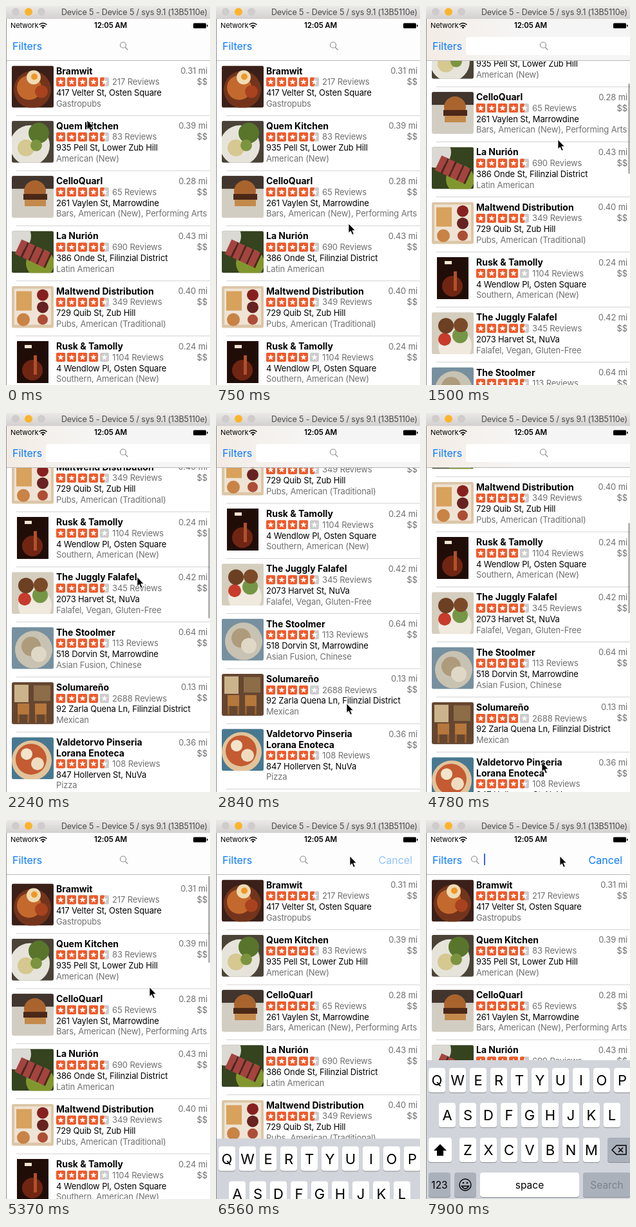
An HTML page that plays this animation: 317 by 587 pixels, repeating every 8000 ms.

```html
<!DOCTYPE html>
<html lang="en">
<head>
<meta charset="utf-8">
<title>Restaurant list</title>
<style>
html, body { margin: 0; width: 100%; height: 100%; overflow: hidden; background: #fff; }
svg { display: block; width: 317px; height: 587px; font: 13px Inter, Roboto, sans-serif; letter-spacing: -.13px; }
.name { font-size: 14px; font-weight: 700; letter-spacing: 0; }
.dim { fill: #707070; }
.link { font-size: 16px; fill: #0a7aff; letter-spacing: 0; }
.key { font-size: 22px; letter-spacing: 0; }
.small { font-size: 15.5px; letter-spacing: 0; }
</style>
</head>
<body>
<svg id="stage" viewBox="0 0 317 587"></svg>
<script>
const LOOP = 8000, TICK = 149, TOP = 84.5, PITCH = 85.3;
const $ = id => document.getElementById(id);

const rect = (x, y, w, h, fill, extra = '') =>
  `<rect x="${x}" y="${y}" width="${w}" height="${h}" fill="${fill}" ${extra}/>`;
const disc = (x, y, r, fill) => `<circle cx="${x}" cy="${y}" r="${r}" fill="${fill}"/>`;
const text = (x, y, s, cls = '', anchor = 'start', extra = '') =>
  `<text x="${x}" y="${y}" class="${cls}" text-anchor="${anchor}" ${extra}>${s.replace('&', '&amp;')}</text>`;
const bg = fill => rect(0, 0, 65, 65, fill);

// name, second line, rating, reviews, address, kind, miles, picture
const places = [
  ['Bramwit', '', 4.5, 217, '417 Velter St, Osten Square', 'Gastropubs', '0.31',
    bg('#3b2019') + disc(32, 37, 29, '#74341c') + disc(27, 34, 19, '#c4692d') + disc(46, 40, 10, '#a8421f') + disc(34, 18, 11, '#f0dcb4') + disc(35, 17, 5, '#ee982a')],
  ['Quem Kitchen', '', 4.5, 83, '935 Pell St, Lower Zub Hill', 'American (New)', '0.39',
    bg('#4b4337') + disc(28, 38, 31, '#e6e4da') + disc(42, 19, 16, '#58752b') + disc(22, 42, 13, '#d5c890') + disc(38, 38, 9, '#7c9440')],
  ['CelloQuarl', '', 4.5, 65, '261 Vaylen St, Marrowdine', 'Bars, American (New), Performing Arts', '0.28',
    bg('#d2cdc3') + rect(0, 0, 65, 20, '#41352e') + disc(36, 24, 17, '#a9642e') + rect(18, 28, 37, 9, '#4b2817') + rect(20, 37, 33, 10, '#c38a4c')],
  ['La Nurión', '', 4.5, 690, '386 Onde St, Filinzial District', 'Latin American', '0.43',
    bg('#35431f') + disc(6, 8, 24, '#dad9d3') + disc(44, 50, 22, '#82962f') + `<g transform="rotate(25 32 34)">` +
    [8, 21, 34, 47].map(x => rect(x, 22, 10, 25, '#a5433f') + rect(x + 10, 22, 3, 25, '#4d2621')).join('') + '</g>'],
  ['Maltwend Distribution', '', 4.5, 349, '729 Quib St, Zub Hill', 'Pubs, American (Traditional)', '0.40',
    bg('#dcc6a7') + rect(4, 4, 57, 56, '#eee3d4') + rect(7, 8, 24, 30, '#d8a15c') + disc(48, 14, 9, '#86211f') + disc(48, 33, 9, '#672321') + disc(48, 52, 8, '#ad4d36') + disc(18, 52, 10, '#c88345')],
  ['Rusk & Tamolly', '', 4, 1104, '4 Wendlow Pl, Osten Square', 'Southern, American (New)', '0.24',
    bg('#fff') + rect(8, 0, 49, 65, '#210d08') + disc(32, 45, 16, '#702513') + rect(20, 6, 11, 5, '#f4e6d0') + rect(34, 22, 5, 30, '#b0512a')],
  ['The Juggly Falafel', '', 4.5, 345, '2073 Harvet St, NuVa', 'Falafel, Vegan, Gluten-Free', '0.42',
    bg('#d5cdbe') + disc(36, 52, 26, '#efe9de') + disc(44, 36, 12, '#759646') + disc(20, 42, 10, '#c63b2c') + disc(22, 21, 12, '#6c4023') + disc(45, 20, 11, '#7b4a28')],
  ['The Stoolmer', '', 4.5, 113, '518 Dorvin St, Marrowdine', 'Asian Fusion, Chinese', '0.64',
    bg('#77909f') + disc(34, 35, 29, '#c8c2b2') + disc(30, 30, 15, '#ad9b7c') + disc(42, 42, 12, '#e0d8c6')],
  ['Solumareño', '', 4, 2688, '92 Zarla Quena Ln, Filinzial District', 'Mexican', '0.13',
    bg('#654630') + rect(4, 4, 22, 27, '#cbb48b') + rect(34, 5, 26, 24, '#8d6d48') + [9, 36].map(x => rect(x, 33, 18, 17, '#b5773b') + rect(x, 50, 3, 13, '#9a602d') + rect(x + 15, 50, 3, 13, '#9a602d')).join('')],
  ['Valdetorvo Pinseria', 'Lorana Enoteca', 4.5, 108, '847 Hollerven St, NuVa', 'Pizza', '0.36',
    bg('#487890') + disc(31, 36, 31, '#e2c39a') + disc(30, 34, 24, '#c45b32') + disc(23, 26, 9, '#f2e4cc') + disc(40, 41, 10, '#efdcc0')],
  ['Nilo Nilo', '', 4, 2386, '364 Galdum St, NuVa', 'Pizza, Italian, Lounges', '0.36',
    bg('#3b3d46') + disc(32, 35, 29, '#aaa598') + disc(32, 34, 23, '#7d6a50') + disc(25, 29, 8, '#d5cfbd') + disc(40, 40, 7, '#c9c0a8')],
  ['Zib Kitchen', '', 4, 299, '129 Ralona St, NuVa', 'Food Stands, Burgers', '0.32',
    bg('#39362f') + rect(0, 0, 65, 6, '#9b8a6c') + [12, 20, 29, 38, 47, 56].map((y, i) => rect(6, y, i % 2 ? 50 : 34, 2, '#aaa698')).join('')],
  ['Drizl', '', 4, 350, '83 Morven Pl, Filinzial District', 'American (New)', '0.42',
    bg('#744628') + disc(16, 18, 13, '#e5ddcf') + disc(46, 24, 14, '#d8c9b2') + disc(26, 49, 14, '#e9e3d8') + disc(46, 24, 8, '#b26733') + disc(26, 49, 8, '#99622f')],
  ['Tovrekker Bar', '', 4, 577, '71 Caddel St, Osten Square', 'Gastropubs', '0.20',
    bg('#4b3225') + rect(8, 3, 19, 32, '#c98d40') + rect(8, 3, 19, 7, '#eddfc4') + disc(38, 50, 22, '#d9d1c4') + disc(38, 46, 12, '#a3622d')],
  ['Quelden', '', 4, 861, '640 Farren St, NuVa', 'American (New), Bars', '0.73',
    bg('#796854') + disc(32, 36, 26, '#ddd4c5') + disc(32, 35, 14, '#a36b3c')]
];

const starPath = Array.from({ length: 10 }, (_, i) => {
  const a = i * Math.PI / 5, r = i % 2 ? 2.1 : 5.2;
  return `${(7 + r * Math.sin(a)).toFixed(2)},${(7.2 - r * Math.cos(a)).toFixed(2)}`;
}).join(' ');

function stars(x, y, rating) {
  return [0, 1, 2, 3, 4].map(i => {
    const full = Math.max(0, Math.min(1, rating - i));
    return `<g transform="translate(${x + 17 * i} ${y})">` + rect(0, 0, 14, 14, '#ccc', 'rx="2"') +
      (full ? rect(0, 0, 14 * full, 14, '#f0592a', 'rx="2"') : '') +
      `<polygon points="${starPath}" fill="#fff"/></g>`;
  }).join('');
}

function listRows() {
  let y = TOP;
  return places.map(([name, more, rating, reviews, address, kind, miles, picture]) => {
    const shift = more ? 16 : 0, height = PITCH + shift;
    const row = `<g transform="translate(0 ${y.toFixed(1)})">` +
      `<g transform="translate(9 8)" clip-path="url(#thumb)">${picture}</g>` +
      text(78, 21, name, 'name') + (more ? text(78, 37.5, more, 'name') : '') +
      text(313, 20.5, miles + ' mi', 'dim', 'end') + text(313, 37.5, '$$', 'dim', 'end') +
      `<g transform="translate(0 ${shift})">` + stars(78, 26, rating) +
      text(165, 37.7, reviews + ' Reviews', 'dim') + text(78, 54.5, address) + text(78, 71.3, kind, 'dim') + '</g>' +
      rect(16, height - .5, 301, 1, '#d2d2d4') + '</g>';
    y += height;
    return row;
  }).join('');
}

const key = (x, y, w, label = '', fill = '#fff', cls = 'key', color = '#000') =>
  rect(x, y + 1, w, 38, '#8b8e93', 'rx="4"') + rect(x, y, w, 38, fill, 'rx="4"') +
  text(x + w / 2, y + (cls === 'key' ? 27 : 24.5), label, cls, 'middle', `fill="${color}"`);

function keyboard() {
  const gray = '#abb1bb';
  const line = (letters, x, y) => [...letters].map((c, i) => key(x + 32 * i, y, 26, c)).join('');
  return rect(1, 372, 316, 216, '#d1d4da') +
    line('QWERTYUIOP', 4, 384) + line('ASDFGHJKL', 20, 438) + line('ZXCVBNM', 52, 492) +
    key(4, 492, 36) + '<path d="M22 502l10 10h-5v8h-10v-8h-5z"/>' +
    key(282, 492, 39, '', gray) +
    '<path d="M289 511l7-7h15v14h-15zM299 507.500l7 7m0-7l-7 7" fill="none" stroke="#000" stroke-width="1.500"/>' +
    key(4, 546, 34, '123', gray, 'small') + key(44, 546, 34, '', gray) +
    '<g fill="none" stroke="#000" stroke-width="1.400"><circle cx="61" cy="565" r="9"/><path d="M55.500 567q5.500 8 11 0z"/></g>' +
    disc(58, 562, 1.3, '#000') + disc(64, 562, 1.3, '#000') +
    key(84, 546, 154, 'space', '#fff', 'small') + key(244, 546, 74, 'Search', gray, 'small', '#7c828b');
}

$('stage').innerHTML = `
<defs>
  <clipPath id="thumb"><rect width="65" height="65" rx="3"/></clipPath>
  <clipPath id="screen"><rect x="1" y="20" width="316" height="567"/></clipPath>
  <linearGradient id="bar" x2="0" y2="1"><stop stop-color="#ebe8e8"/><stop offset="1" stop-color="#d3d0d0"/></linearGradient>
  <linearGradient id="tint"><stop stop-color="#f3ece5"/><stop offset=".3" stop-color="#f5f2ef"/><stop offset=".45" stop-color="#f5f5f5"/></linearGradient>
</defs>
${rect(0, 0, 317, 587, '#fff')}
<g clip-path="url(#screen)">
  <g id="list">${listRows()}</g>
  ${rect(0, 20, 317, 64, '#fdfdfd')}
  <g id="tinted">${rect(0, 20, 317, 64, 'url(#tint)')}${rect(62, 48, 260, 28, '#fff', 'rx="4"')}</g>
  ${rect(0, 84, 317, 1, '#b9b9bb')}
  ${text(7, 34, 'Network', '', 'start', 'font-size="11"')}
  <g fill="none" stroke="#000" stroke-width="1.600"><path d="M51.500 29q6-5 12 0M53.800 31.600q3.700-3 7.400 0"/></g>
  ${disc(57.5, 33.4, 1.4, '#000')}
  ${text(162.5, 34, '12:05 AM', '', 'middle', 'font-size="11.5" font-weight="600"')}
  ${rect(291, 26.5, 20, 8, '#000', 'rx="1.5"')}${rect(312, 29, 1.5, 3, '#000')}
  ${text(10, 68, 'Filters', 'link')}
  <g id="lens" fill="none" stroke="#8e8e93" stroke-width="1.200"><circle cx="-1" cy="60.500" r="4.500"/><path d="M2.300 64l4 4"/></g>
  <rect id="caret" x="90" y="52" width="2" height="18" fill="#3c68e8"/>
  <g id="cancel">${text(305, 67.5, 'Cancel', 'link', 'end')}</g>
  <rect id="thumbBar" x="314.500" width="2" rx="1" fill="#000"/>
  <g id="keys">${keyboard()}</g>
</g>
${rect(0, 0, 317, 20, 'url(#bar)')}
${disc(15, 9, 6, '#d0cccc')}${disc(35, 9, 6, '#fdb42c')}${disc(55, 9, 6, '#d0cccc')}
${text(313, 14, 'Device 5 - Device 5 / sys 9.1 (13B5110e)', '', 'end', 'font-size="12.5" fill="#484848"')}
${rect(0, 20, 1, 567, '#8d8d8d')}
<path id="pointer" d="M0 0v14.500l3.300-3 2.500 5.700 2.500-1-2.500-5.500h4.500z" stroke="#fff" stroke-width=".8"/>`;

// Keyed by tick, linear in between
const scrollPath = [[8, 0], [9, 45], [10, 130], [11, 215], [12, 278], [14, 345], [16, 371], [19, 371], [20, 430],
  [22, 600], [23, 662], [25, 728], [27, 755], [28, 755], [29, 718], [30, 628], [32, 327], [33, 190], [34, 75], [35, -20], [36, -6], [38, 0]];
const pointerX = [[0, 126], [5, 206], [10, 205], [19, 203], [25, 198], [28, 188], [32, 180], [36, 223], [39, 216], [41, 208]];
const pointerY = [[0, 177], [5, 337], [8, 337], [9, 292], [10, 207], [11, 122], [13, 130], [18, 440], [19, 450], [20, 391],
  [22, 221], [23, 230], [25, 337], [28, 113], [29, 150], [30, 240], [32, 541], [33, 530], [36, 259], [39, 214], [41, 56]];
const barFade = [[8, 0], [9, 1], [16, 1], [19, 0], [20, 1], [39, 1], [41, 0]];
const caretFade = [[46, 0], [47, 1], [48, 1], [50, 0], [51, 0], [53, 1]];

function track(points, t) {
  const i = points.findIndex(p => p[0] > t);
  if (i < 0) return points[points.length - 1][1];
  if (i === 0) return points[0][1];
  const [t0, a] = points[i - 1], [t1, b] = points[i];
  return a + (b - a) * (t - t0) / (t1 - t0);
}

function draw(time) {
  const tick = Math.floor(time % LOOP / TICK);
  const scroll = track(scrollPath, tick);
  const open = 1 - (1 - track([[43, 0], [47, 1]], tick)) ** 2;
  $('list').setAttribute('transform', `translate(0 ${-scroll})`);
  $('tinted').setAttribute('opacity', Math.max(0, Math.min(1, scroll / 40)));
  $('thumbBar').setAttribute('y', 87 + Math.max(0, scroll) * .2544);
  $('thumbBar').setAttribute('height', 140 + Math.min(0, scroll));
  $('thumbBar').setAttribute('opacity', .4 * track(barFade, tick));
  $('pointer').setAttribute('transform', `translate(${track(pointerX, tick)} ${track(pointerY, tick)})`);
  $('lens').setAttribute('transform', `translate(${183 - 107 * open} 0)`);
  $('cancel').setAttribute('opacity', open);
  $('caret').setAttribute('opacity', track(caretFade, tick));
  $('keys').setAttribute('transform', `translate(0 ${216 * (1 - open)})`);
}

const start = performance.now();
function frame() {
  draw(performance.now() - start);
  requestAnimationFrame(frame);
}
frame();
</script>
</body>
</html>
```
